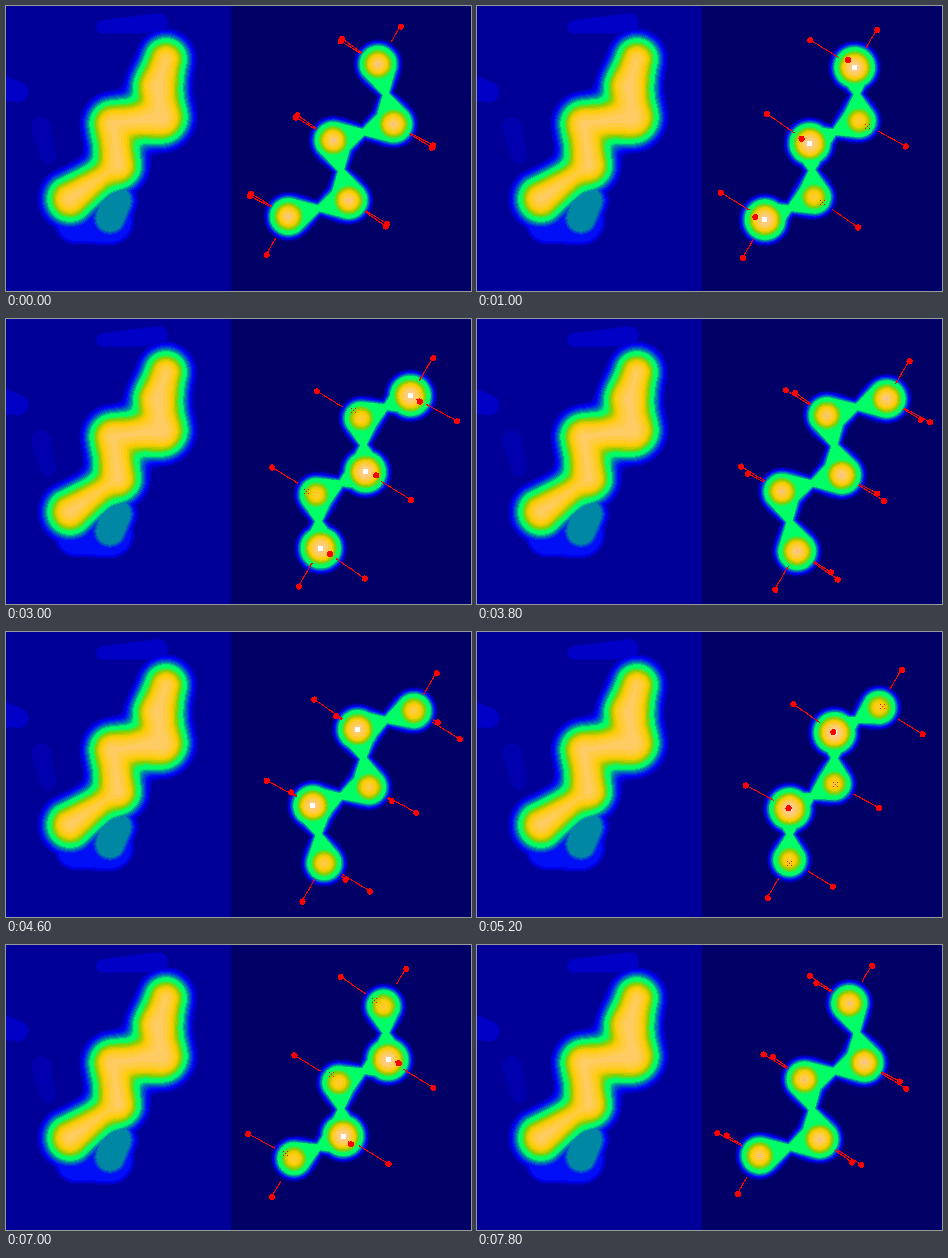
A matplotlib script for the animation above (8 s loop, 465x285 px).

```python
import numpy as np
import matplotlib.pyplot as plt
from matplotlib.animation import FuncAnimation
from matplotlib.colors import LinearSegmentedColormap

W, H, DPI = 465, 285, 100
FRAMES, STEP = 40, 200
SPLIT, BANDS = 225, 30
RED = (255, 0, 0)

HEAT = LinearSegmentedColormap.from_list("heat", [
    (0, "#000066"), (.1, "#000099"), (.25, "#0000ff"), (.42, "#009999"),
    (.48, "#00ff66"), (.6, "#00ff66"), (.72, "#8ccc00"), (.82, "#ffcc00"),
    (1, "#ffcca0")], N=BANDS + 1)

X, Y = np.meshgrid(np.arange(W) + .5, np.arange(H) + .5)


def colorize(v):
    bands = np.round(np.clip(v, 0, 1) * BANDS).astype(int)
    return HEAT(bands, bytes=True)[..., :3].copy()


# ---- left: fixed scan image -------------------------------------------
def capsule(x0, y0, r0, x1, y1, r1):
    """Signed distance to a round-ended bar."""
    dx, dy = x1 - x0, y1 - y0
    t = np.clip(((X - x0) * dx + (Y - y0) * dy) / (dx * dx + dy * dy), 0, 1)
    return np.hypot(X - x0 - t * dx, Y - y0 - t * dy) - r0 - t * (r1 - r0)


def shelf(dist, level):
    return level - .032 * np.maximum(dist, 0)


def scan():
    spine = [(160, 53, 20), (152, 80, 21), (155, 111, 23),
             (107, 118, 20), (112, 159, 22)]
    bars = [capsule(*p, *q) for p, q in zip(spine, spine[1:])]
    bars.append(capsule(108, 162, 14, 64, 193, 22))
    k = 4
    dist = -k * np.log(sum(np.exp(-b / k) for b in bars))
    body = shelf(dist, .48) + .5 * (1 - np.exp(np.minimum(dist, 0) / 9))
    return colorize(np.max([
        body,
        shelf(capsule(110, 195, 14, 104, 212, 13), .4),
        shelf(capsule(70, 217, 17, 104, 215, 20), .28),
        shelf(capsule(97, 21, 6, 152, 17, 9), .16),
        shelf(capsule(35, 121, 9, 42, 150, 7), .14),
        shelf(capsule(0, 83, 11, 12, 86, 9), .17),
        np.full((H, W), .1)], axis=0))


# ---- right: rotating chain --------------------------------------------
AXIS = np.array([.507, -.862])
SIDE = np.array([.866, .5])
MID = np.array([345.2, 145.2])
PITCH, RADIUS = 44.2, 21.9
CH, SPREAD = 53.6, np.radians(34)
BURIED = -65                     # depth of the floor
GREEN = .47


def carbons(th):
    """Place, height (-1 to 1) and side of each carbon."""
    for i in range(5):
        side = 1 if i % 2 else -1
        pos = MID + AXIS * PITCH * (i - 2) + SIDE * RADIUS * side * np.cos(th)
        yield pos, -side * np.sin(th), side


def dome(q):
    return .93 + .08 * q, 25.6 + 2.6 * q     # peak value, radius


def atom(pos, q):
    top, r = dome(q)
    return top * (1 - ((X - pos[0]) ** 2 + (Y - pos[1]) ** 2) / r ** 2)


def half_bond(pos, q, other):
    """Cone tangent to the atom, narrowing to the middle of the bond."""
    top, r = dome(q)
    half = np.linalg.norm(other - pos) / 2
    mid, d = (pos + other) / 2, (pos - other) / (2 * half)
    x = (X - mid[0]) * d[0] + (Y - mid[1]) * d[1]
    y = np.abs((Y - mid[1]) * d[0] - (X - mid[0]) * d[1])
    s = min(r * np.sqrt(1 - GREEN / top) / half, .62)
    c = np.sqrt(1 - s * s)
    along = x * c + y * s
    taper = np.clip(1 - along / (half * c), 0, 1)
    edge = y * c - x * s - 2.5 * taper
    v = np.where(edge < 0, .54, GREEN * (1 - edge / (9 - 3 * taper)))
    return np.where((along < half * c) & (x > -5), v, 0)


def hydrogens(i, pos, side, q, th):
    """Place, rise above the carbon and where the stick emerges."""
    lean = 2.8 if i > 1 else -2.8
    tip = i in (0, 4)
    for turn in (-1, 1):
        a = th + turn * SPREAD
        u = side * CH * np.cos(a)
        ax = lean * (tip == (turn > 0)) - .027 * u
        yield pos + SIDE * u + AXIS * ax, -side * CH * np.sin(a), 20 - 2.5 * q
    if tip:
        yield (pos + AXIS * 44 * np.sign(lean), 0,
               21.3 + 4 * np.cos(th) - 2.3 * q)


def draw_stick(img, pos, h, rise, z, start):
    t = np.linspace(0, 1, 80)
    seen = (((t * np.linalg.norm(h - pos) > start) | (t * rise > 38))
            & (z + t * rise > BURIED))
    x, y = np.floor(pos[:, None] + (h - pos)[:, None] * t[seen]).astype(int)
    img[y, x] = RED


def draw_dot(img, h):
    img[np.hypot(X - h[0] - .5, Y - h[1] - .5) < 3.1] = RED


def speckle(img, pos, color, size):
    x, y = np.floor(pos).astype(int)
    for dx in (-size, 0, size):
        for dy in (-size, 0, size):
            if (dx + dy) // size % 2 == 0:
                img[y + dy, x + dx] = color


def draw_carbon(img, pos, q):
    x, y = np.floor(pos).astype(int)
    if q > .35:
        img[y - 2:y + 3, x - 2:x + 3] = 255
    elif q > -.35:
        speckle(img, pos, (225, 180, 215), 1)


LEFT = scan()[:, :SPLIT]

fig = plt.figure(figsize=(W / DPI, H / DPI), dpi=DPI)
ax = fig.add_axes([0, 0, 1, 1])
ax.axis("off")
picture = ax.imshow(np.zeros((H, W, 3), np.uint8), extent=(0, W, H, 0),
                    interpolation="nearest", aspect="auto")


def draw(n):
    th = 2 * np.pi * n / FRAMES
    chain = list(carbons(th))
    v = np.zeros((H, W))
    for i, (pos, q, _) in enumerate(chain):
        v = np.maximum(v, atom(pos, q))
        for j in (i - 1, i + 1):
            if 0 <= j < 5:
                v = np.maximum(v, half_bond(pos, q, chain[j][0]))
    img = colorize(v)
    img[:, :SPLIT] = LEFT

    for i, (pos, q, side) in enumerate(chain):
        draw_carbon(img, pos, q)
        z = RADIUS * q
        for h, rise, start in hydrogens(i, pos, side, q, th):
            draw_stick(img, pos, h, rise, z, start)
            if z + rise > BURIED:
                draw_dot(img, h)
            else:
                speckle(img, h, RED, 2)
    picture.set_data(img)
    return picture,


anim = FuncAnimation(fig, draw, frames=FRAMES, interval=STEP,
                     repeat=True, repeat_delay=0)
plt.show()
```
